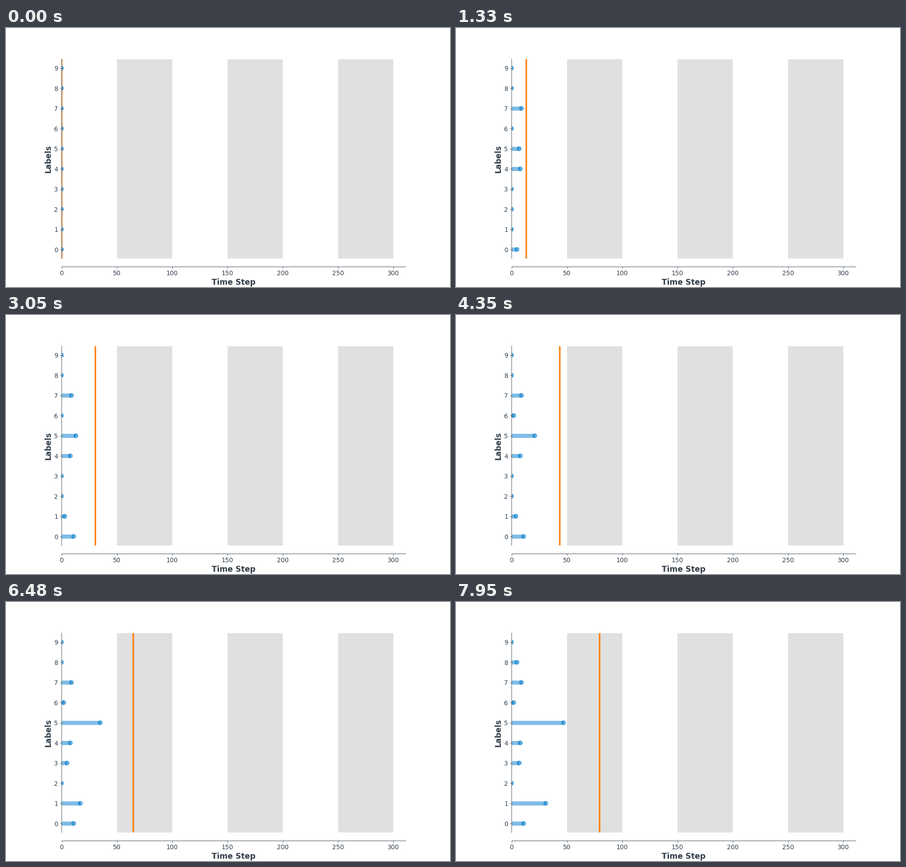
A matplotlib script that plays this animation: 980 by 572 pixels, repeating every 8 s.

```python
import numpy as np
import matplotlib.pyplot as plt
from matplotlib.animation import FuncAnimation

LOOP, STEP = 8000, 25          # ms
SPEED = 10                     # time steps per second
EASE = 1.29                    # every count speeds up gently
K = 980 / 12 / 80              # point scale at 80 dpi
INK, BLUE, ORANGE, BAND = "#333F4B", "#007ACC", "#FF7F0E", "#E0E0E0"
ROWS = np.arange(10)

# label: runs of (first step, last step, gain)
RUNS = {
    0: [(6, 18, 11)],
    1: [(17, 24, 3), (40, 79, 28)],
    3: [(46, 69, 7)],
    4: [(0, 9, 8)],
    5: [(0, 13, 7), (13, 78.8, 40)],
    6: [(30, 32, 2)],
    7: [(0, 9, 9)],
    8: [(67, 77, 5)],
}


def count(label, step):
    total = 0
    for first, last, gain in RUNS.get(label, []):
        part = np.clip((step - first) / (last - first), 0, 1)
        total += int(gain * part ** EASE)
    return total


plt.rcParams.update({
    "font.family": "DejaVu Sans",
    "axes.edgecolor": INK, "axes.linewidth": 0.8 * K,
})

fig = plt.figure(figsize=(12.25, 7.15), dpi=80, facecolor="white")
ax = fig.add_axes([0.125, 0.11, 0.775, 0.77])
ax.set_xlim(0, 311)
ax.set_ylim(-0.45, 9.45)
ax.set_xticks(range(0, 301, 50))
ax.set_yticks(ROWS)
ax.tick_params(labelsize=12 * K, color=INK, labelcolor=INK,
               length=3.5 * K, width=0.8 * K, pad=3.5 * K)
for side in ("top", "right"):
    ax.spines[side].set_visible(False)
ax.spines["bottom"].set_position(("axes", -0.04))
ax.spines["left"].set_position(("axes", 0.0005))
ax.spines["left"].set_snap(False)

label_style = dict(fontsize=15 * K, fontweight="bold", color=INK)
ax.set_xlabel("Time Step", labelpad=4 * K, **label_style)
ax.set_ylabel("Labels", labelpad=3 * K, **label_style)

for left in (50, 150, 250):
    ax.axvspan(left, left + 50, facecolor=BAND, edgecolor="none", lw=0, zorder=0)

# Snapping is off so that edges move smoothly between pixels.
cursor = ax.axvline(0, color=ORANGE, lw=3 * K, zorder=1.9, snap=False)
bars = [ax.plot([0, 0], [y, y], color=BLUE, alpha=0.5, lw=8 * K, snap=False,
                solid_capstyle="butt", zorder=2)[0] for y in ROWS - 0.007]
dots = ax.scatter(0 * ROWS, ROWS, s=np.full(10, (8 * K) ** 2), color=BLUE,
                  alpha=0.6, linewidths=K, zorder=2.1)


def draw(i):
    x = (i + 0.5) * STEP / 1000 * SPEED
    counts = [count(label, int(x)) for label in ROWS]
    cursor.set_xdata([x, x])
    for bar, n in zip(bars, counts):
        bar.set_xdata([0, n])
    dots.set_offsets(np.column_stack([counts, ROWS]))
    return [cursor, dots, *bars]


anim = FuncAnimation(fig, draw, frames=LOOP // STEP, interval=STEP,
                     init_func=lambda: draw(0), repeat=True, repeat_delay=0)
plt.show()
```
